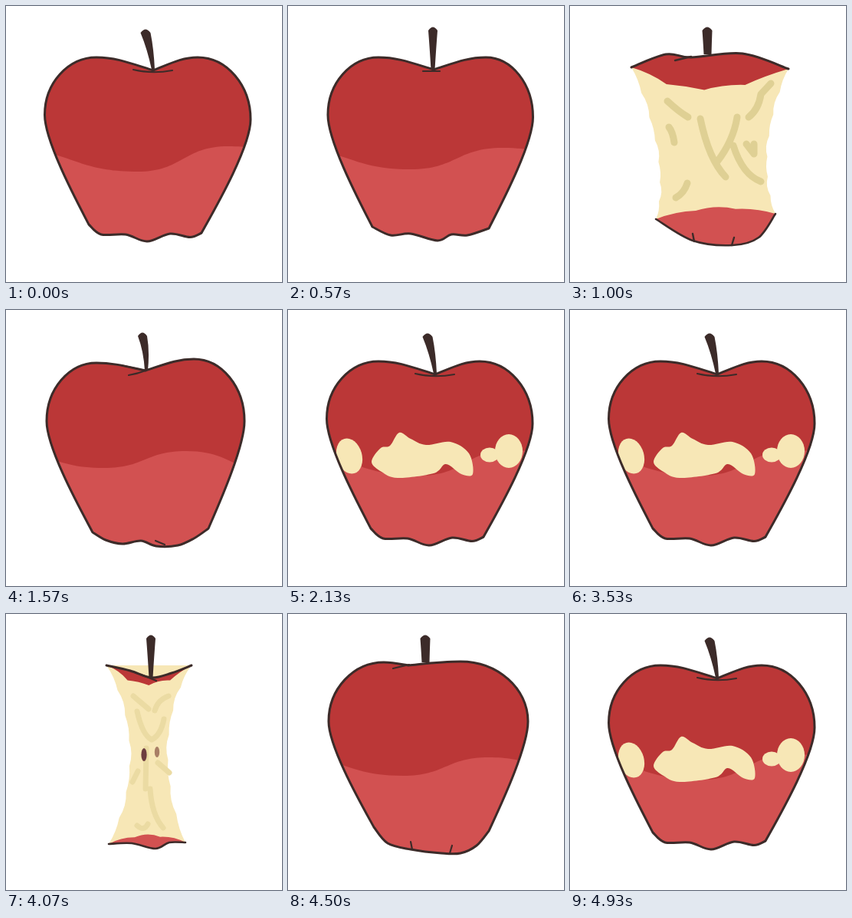
Write an HTML page that moves like this. It is 360 by 360 pixels and loops after 5000 ms.

```html
<!DOCTYPE html>
<html lang="en">
<head>
<meta charset="utf-8">
<title>Apple</title>
<style>
  html, body { margin: 0; width: 100%; height: 100%; overflow: hidden; background: #fff; }
  svg { display: block; width: 100vw; height: 100vh; stroke-linecap: round; stroke-linejoin: round; }
  g.pose { display: none; }
  g.pose.on { display: inline; }
</style>
</head>
<body>
<svg id="stage" viewBox="0 0 360 360"></svg>
<script>
const RED = '#bb3737', PINK = '#d25151', INK = '#3c2b29', CREAM = '#f7e7b6';

const lerp = (a, b, t) => a + (b - a) * t;
const fill = (d, c) => `<path d="${d}" fill="${c}"/>`;
const stroke = (d, w = 3, c = INK) => `<path d="${d}" fill="none" stroke="${c}" stroke-width="${w}"/>`;

// Blends two drawings number by number; anything else comes from the first.
function mix(a, b, t) {
  if (typeof a === 'number') return lerp(a, b, t);
  if (Array.isArray(a)) return a.map((v, i) => mix(v, b[i], t));
  if (typeof a === 'object')
    return Object.fromEntries(Object.keys(a).map(k => [k, mix(a[k], b[k], t)]));
  return a;
}

// Smooth curve through points, without the opening move.
function through(pts, closed) {
  const n = pts.length;
  const at = i => closed ? pts[(i + n) % n] : pts[Math.max(0, Math.min(n - 1, i))];
  let d = '';
  for (let i = 0; i < (closed ? n : n - 1); i++) {
    const [a, b, c, e] = [-1, 0, 1, 2].map(k => at(i + k));
    const out = b.map((v, k) => v + (c[k] - a[k]) / 6);
    const into = c.map((v, k) => v - (e[k] - b[k]) / 6);
    d += `C${out} ${into} ${c}`;
  }
  return d;
}

// A row of n bites along a quadratic curve, each pushed sideways by depth.
function bitten(from, ctrl, to, n, depth) {
  const at = t => from.map((v, k) => lerp(lerp(v, ctrl[k], t), lerp(ctrl[k], to[k], t), t));
  let d = '';
  for (let i = 0; i < n; i++) {
    const [p, m, q] = [i, i + .5, i + 1].map(s => at(s / n));
    const [dx, dy] = [q[0] - p[0], q[1] - p[1]];
    const r = depth * 2 / Math.hypot(dx, dy) * (i % 2 ? 1 : .6);
    d += `Q${m[0] - dy * r} ${m[1] + dx * r} ${q}`;
  }
  return d;
}

// Half an apple from dip to foot: shoulder, round lobe, tapering side.
function half([dx, dy], [lx, ly], [wx, wy], [fx, fy]) {
  return [
    [[lerp(dx, lx, .4), lerp(dy, ly, .55)], [lerp(dx, lx, .65), ly], [lx, ly]],
    [[lerp(lx, wx, .55), ly], [wx, lerp(ly, wy, .45)], [wx, wy]],
    [[wx, lerp(wy, fy, .25)], [lerp(fx, wx, .23), lerp(fy, wy, .18)], [fx, fy]]
  ];
}

function outline({ dip, right, bottom, left }) {
  const back = half(dip, ...left).flat().reverse().slice(1);
  return `M${dip}` + half(dip, ...right).map(s => 'C' + s.join(' ')).join('') +
    through([right[2], ...bottom, left[2]]) + `C${[...back, dip].join(' ')}Z`;
}

function wave([low, high, end]) {
  const stops = [[0, 186], low, high, [360, end]];
  return 'M0 360L0 186' + stops.slice(1).map(([x, y], i) => {
    const [px, py] = stops[i], mid = (px + x) / 2;
    return `C${mid} ${py} ${mid} ${y} ${x} ${y}`;
  }).join('') + 'L360 360Z';
}

function stem([x, y, w, bx, by, bw, bend]) {
  const mx = (x + bx) / 2 + bend, mw = (w + bw) / 2, my = (y + by) / 2 - 3;
  return fill(`M${x - w} ${y}q${w} -9 ${2 * w} 0Q${mx + mw} ${my} ${bx + bw} ${by}` +
    `H${bx - bw}Q${mx - mw} ${my} ${x - w} ${y}Z`, INK);
}

let clips = 0;
function apple(a, bites = '') {
  const id = 'skin' + clips++, d = outline(a);
  return `<clipPath id="${id}"><path d="${d}"/></clipPath>` + fill(d, RED) +
    `<g clip-path="url(#${id})">${fill(wave(a.wave), PINK)}${bites}</g>` +
    stroke(d) + stroke(a.crease, 2.2) + stem(a.stem);
}

function core(c, a) {
  const { top, base } = c;
  const [tl, tr, br, bl] = [top[0], top.at(-1), base[0], base.at(-1)];
  const rim = `M${top[0]}` + through(top), floor = `M${base[0]}` + through(base);
  return fill(`M${tl}L${tr}` + bitten(tr, c.waist[1], br, 7, 2.5) + `L${bl}` +
      bitten(bl, c.waist[0], tl, 7, 2.5) + 'Z', CREAM) +
    stroke(c.smears, c.smearWidth, c.shade) + (c.seeds || '') +
    fill(rim + bitten(tr, c.under, tl, 4, 3) + 'Z', RED) +
    fill(floor + bitten(bl, c.over, br, 3, -3) + 'Z', PINK) +
    stroke(rim) + stroke(floor, 2.6) + stroke(c.crease, 2.4) + stem(a.stem);
}

// Each side lists lobe top, widest point and foot.
const A = {
  dip: [192, 84], right: [[250, 67], [319, 148], [255, 296]], left: [[118, 67], [50.5, 142], [108, 285]],
  bottom: [[240, 301.5], [214, 297], [184, 307], [156, 298], [124, 298]],
  wave: [[172, 216], [290, 183], 188], stem: [182, 35, 6.5, 192, 83, 2, 1.5],
  crease: 'M166 83Q190 89 217 84'
};
const B = {
  dip: [182, 79], right: [[245, 64], [311, 145], [264, 285]], left: [[118, 69], [53, 145], [113, 290]],
  bottom: [[245, 298], [224, 307], [196, 308], [176, 301], [152, 305], [130, 300]],
  wave: [[128, 206], [235, 184], 215], stem: [178, 34, 6, 183, 79, 2, 3],
  crease: 'M160 85Q172 83 182 79L150 72M195 301L207 306'
};
const C = {
  dip: [157, 67], right: [[225, 62], [313, 140], [262, 283]], left: [[125, 63], [53, 140], [112, 278]],
  bottom: [[246, 302], [225, 312], [200, 312], [160, 307], [130, 299]],
  wave: [[150, 211], [262, 187], 200], stem: [179, 32, 6.5, 179.5, 63, 5, 0],
  crease: 'M137 71L158 66M160 297L162 307M214 302L211 312'
};
const E = {
  dip: [190, 83], right: [[258, 67], [319.5, 145], [262, 290]], left: [[118, 67], [52, 142], [110, 288]],
  bottom: [[234, 299], [213, 298], [195, 306], [160, 297], [134, 299]],
  wave: [[160, 213], [280, 185], 192], stem: [189, 32, 6, 189, 83, 2.5, 0],
  crease: 'M176 85L198 85'
};
const D = mix(E, C, .5);

const wideCore = {
  top: [[80, 80], [125, 63], [158, 67], [225, 62], [285, 82]],
  base: [[268, 271], [246, 302], [212, 312], [160, 306], [112, 278]],
  waist: [[131, 200], [240, 190]], under: [168, 138], over: [190, 255],
  smears: `M127 124Q142 138 154 145M129 158Q134 164 136 178M153 231Q149 244 138 250
    M170 147Q181 200 203 223M218 145Q213 176 192 203M213 182Q225 220 249 229
    M233 145Q246 135 249 115L262 101M230 180L240 193L240 180`,
  smearWidth: 9, shade: '#dfd094', crease: C.crease
};
const thinCore = {
  top: [[131, 67], [162, 74], [190, 83], [216, 77], [242, 67]],
  base: [[234, 298], [213, 298], [195, 306], [164, 299], [134, 300]],
  waist: [[190, 180], [185, 165]], under: [186, 119], over: [185, 281],
  smears: `M166 107L186 124M212 107Q198 112 194 126M171 127Q178 158 190 164Q202 158 206 137
    M183 175L182 228M172 205L165 219M198 194L213 207M188 228Q190 262 205 279M171 276Q180 284 185 274`,
  smearWidth: 7, shade: '#ebdba3', crease: 'M176 79L196 87',
  seeds: `<ellipse cx="180" cy="183.5" rx="3.6" ry="8.6" fill="#6e3d40"/>
    <ellipse cx="197" cy="180" rx="3.2" ry="7" fill="#a97f66"/>`
};
const midCore = { ...mix(thinCore, wideCore, .35), seeds: '' };

const chunk = [[109, 198], [121, 180], [133, 177], [145, 160], [160, 168], [180, 176], [212, 172],
  [236, 187], [241, 214], [226, 214], [206, 201], [190, 213], [143, 219], [122, 211]];
const nibbles = fill(`M${chunk[0]}${through(chunk, true)}Z`, CREAM) +
  `<g fill="${CREAM}"><ellipse rx="16.5" ry="23.5" transform="translate(80 190.5) rotate(-16)"/>
   <ellipse cx="288" cy="184" rx="18" ry="22"/><ellipse cx="263" cy="189" rx="12" ry="9.5"/></g>`;

const band = fill('M40 140' + bitten([40, 140], [180, 126], [325, 135], 7, 4) + 'V225' +
  bitten([325, 225], [180, 250], [40, 220], 7, 4) + 'Z', CREAM);
const gaps = fill('M30 130H56' + bitten([56, 130], [82, 180], [84, 228], 3, -3) + 'H30Z' +
  'M340 130H307' + bitten([307, 130], [282, 180], [284, 228], 3, 3) + 'H340Z', '#fff');

const poses = [
  ...[A, B, C, D, E].map(a => apple(a)),
  apple(A, nibbles), apple(B, band) + gaps, core(wideCore, C), core(midCore, D), core(thinCore, E)
];
const holds = [140, 130, 130, 140, 160];
const LOOP = 5000, CYCLE = 1400, LEAD = 30;

const stage = document.getElementById('stage');
stage.innerHTML = poses.map(p => `<g class="pose">${p}</g>`).join('');
const groups = stage.querySelectorAll('.pose');

function poseAt(t) {
  let left = Math.max(0, t - LEAD) % CYCLE, i = 0;
  while (left >= holds[i % 5]) left -= holds[i++ % 5];
  return i;
}

function tick() {
  const now = poseAt(performance.now() % LOOP);
  groups.forEach((g, i) => g.classList.toggle('on', i === now));
  requestAnimationFrame(tick);
}
tick();
</script>
</body>
</html>
```
